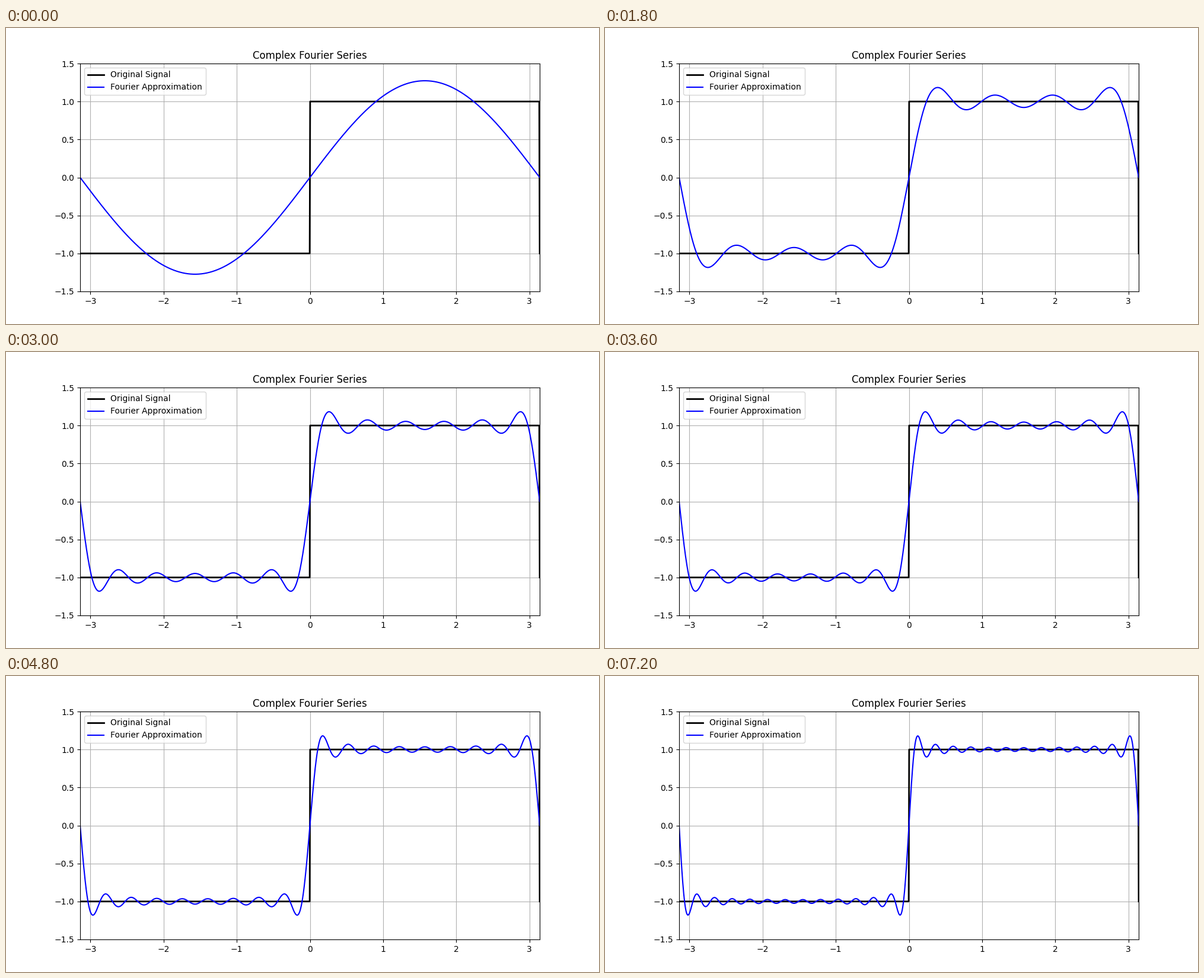
Animation, 1000 px wide and 500 px high, one loop 7500 ms. Source, as a matplotlib script:

```python
import numpy as np
import matplotlib.pyplot as plt
from matplotlib.animation import FuncAnimation

FRAMES = 25
INTERVAL = 300  # ms

x = np.linspace(-np.pi, np.pi, 1000)
square_wave = np.where(np.mod(x, 2 * np.pi) < np.pi, 1.0, -1.0)


def partial_sum(order):
    """Fourier series of the square wave up to the given harmonic."""
    n = np.arange(1, order + 1, 2)[:, None]
    return (4 / np.pi * np.sin(n * x) / n).sum(axis=0)


fig, ax = plt.subplots(figsize=(10, 5), dpi=100)
ax.plot(x, square_wave, color="black", lw=2, label="Original Signal")
approximation, = ax.plot(x, partial_sum(1), color="blue", lw=1.5,
                         label="Fourier Approximation")
ax.set_xlim(-np.pi, np.pi)
ax.set_ylim(-1.5, 1.5)
ax.set_title("Complex Fourier Series")
ax.grid(True)
ax.legend(loc="upper left")


def update(frame):
    approximation.set_ydata(partial_sum(frame + 1))
    return approximation,


anim = FuncAnimation(fig, update, frames=FRAMES, interval=INTERVAL,
                     repeat=True, repeat_delay=0)
plt.show()
```
